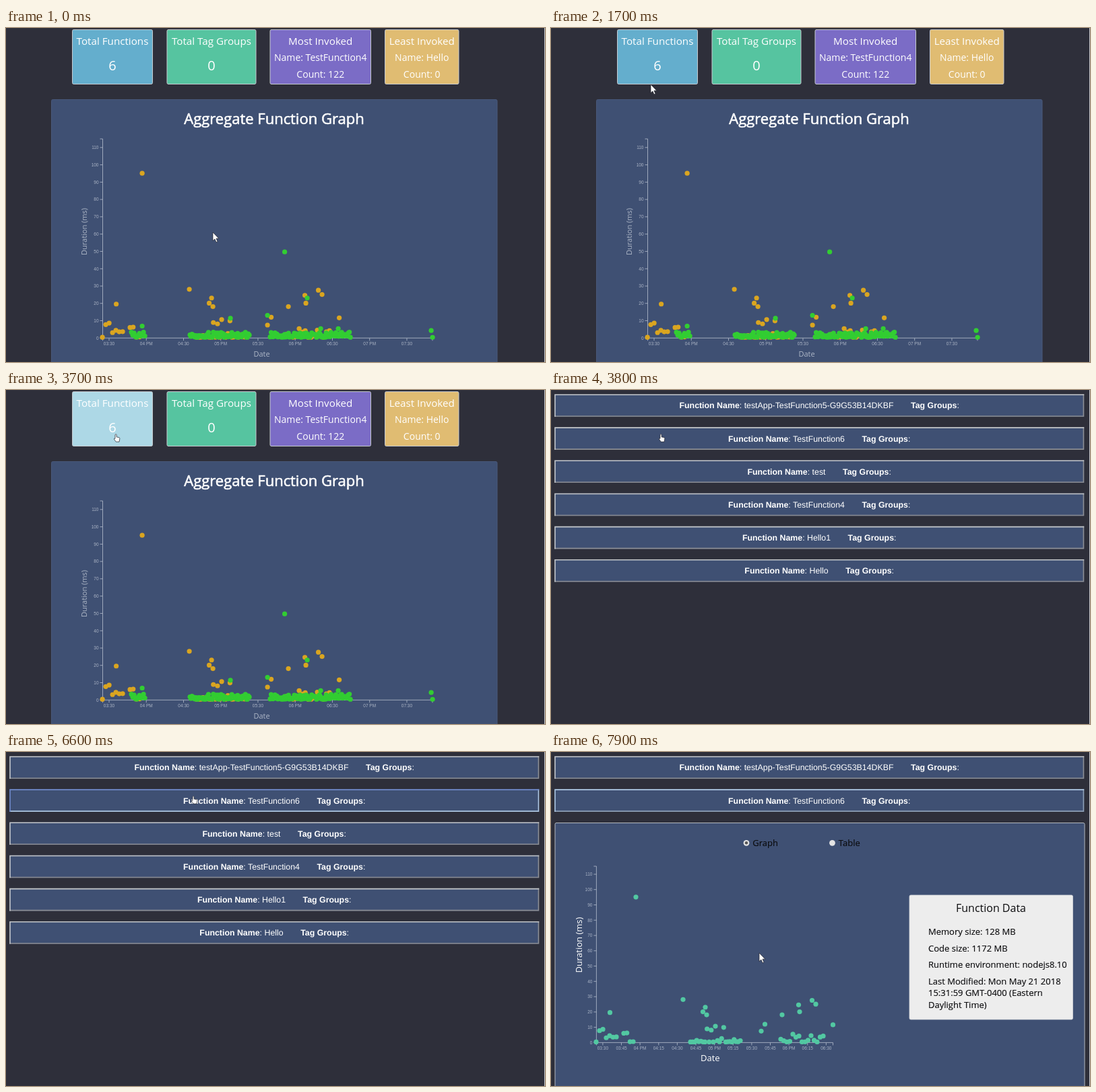
Write an HTML page that moves like this. It is 800x497 px and loops after 8 s.

```html
<!DOCTYPE html>
<html lang="en">
<head>
<meta charset="utf-8">
<title>Function dashboard</title>
<style>
  html, body { margin: 0; width: 100%; height: 100%; overflow: hidden; background: #2e2f3a; }
  svg { display: block; width: 100vw; height: 100vh; }
  text { font-family: "Open Sans", sans-serif; white-space: pre; }
  .small { font: 6.5px "Liberation Sans", Arial, sans-serif; }
  .row { font: 12.36px "Liberation Sans", Arial, sans-serif; text-rendering: geometricPrecision; }
</style>
</head>
<body>
<svg id="stage" viewBox="0 0 800 497" preserveAspectRatio="none"></svg>
<script>
const NS = "http://www.w3.org/2000/svg";
const stage = document.getElementById("stage");
const LOOP = 8000, OPEN_LIST = 3800, PRESS = 6600, OPEN_PANEL = 6700;
const BACK = "#2e2f3a", PANEL = "#3f5073", INK = "#0c0c0e";
const ROW_TOP = 6.2, ROW_STEP = 49.15, ROW_HEIGHT = 33.6, ROW_WIDTH = 786;

function add(parent, tag, attrs = {}, content = "") {
  const node = document.createElementNS(NS, tag);
  for (const key in attrs) node.setAttribute(key, attrs[key]);
  node.textContent = content;
  parent.appendChild(node);
  return node;
}

function label(parent, x, y, size, content, fill = "#fff", anchor = "middle", more = {}) {
  return add(parent, "text", { x, y, "font-size": size, fill, "text-anchor": anchor, ...more }, content);
}

function upright(parent, x, y, size, content, fill) {
  return label(parent, 0, 0, size, content, fill, "middle", { transform: `translate(${x} ${y}) rotate(-90)` });
}

function heavy(color, width) {
  return { stroke: color, "stroke-width": width };
}

function box(parent, x, y, width, height, fill, more = {}) {
  return add(parent, "rect", { x, y, width, height, fill, ...more });
}

function seeded(seed) {
  return () => (seed = (seed * 16807) % 2147483647) / 2147483647;
}

// Draws both axes and returns a function that plots [offset, ms] points.
function chart(parent, { x, zero, top, right, perMs, minutes, ink }) {
  const line = d => add(parent, "path", { d, fill: "none", stroke: ink, "stroke-width": 0.9 });
  const step = minutes * 1.8415;
  line(`M${x - 4} ${top}H${x}V${zero}H${x - 4}M${x} ${zero + 4}V${zero}H${right}V${zero + 4}`);
  for (let ms = 0; ms <= 110; ms += 10) {
    const y = zero - ms * perMs;
    line(`M${x - 4} ${y}h4`);
    label(parent, x - 6, y + 2.3, 6.5, ms, ink, "end", { class: "small" });
  }
  for (let i = 0, tx = x + 9.5; tx < right - 4; i++, tx += step) {
    const total = 210 + i * minutes;
    const hour = "0" + Math.floor(total / 60), rest = total % 60;
    line(`M${tx} ${zero}v4`);
    label(parent, tx, zero + 10.8, 6.5, rest ? `${hour}:${rest}` : `${hour} PM`, ink, "middle", { class: "small" });
  }
  return (points, fill) => points.forEach(([offset, ms]) =>
    add(parent, "circle", { cx: x - 0.4 + offset, cy: zero - 0.3 - ms * perMs, r: 3.6, fill }));
}

// Evenly spread calls from one offset to another, durations skewed towards zero.
function burst(random, from, to, count, longest, skew) {
  return Array.from({ length: count }, (_, i) =>
    [from + (to - from) * i / (count - 1), 0.3 + longest * random() ** skew]);
}

const random = seeded(29);
const slowCalls = [
  [59, 95], [129, 28], [162, 23], [158.5, 20], [164, 18], [20.5, 19.5],
  [276, 18], [300.5, 24.5], [302, 20], [320.5, 27.5], [326, 25], [351.5, 11.5],
  ...burst(random, 0, 30, 7, 9, 1),
  ...burst(random, 41, 55, 4, 12, 2),
  ...burst(random, 140, 214, 25, 11, 4),
  ...burst(random, 245, 250.5, 2, 12, 0.5),
  ...burst(random, 274, 337, 15, 6, 4)
];
const fastCalls = [
  ...burst(random, 43, 63, 11, 3, 1),
  ...burst(random, 130, 218, 62, 3, 1.6),
  ...burst(random, 249, 368, 84, 3, 1.6),
  [59, 6.8], [190, 11.3], [245, 13], [270.5, 49.6], [304, 23], [324, 5.3], [350, 5.3], [488, 4.2], [490, 0.3]
];

/* Dashboard */
const dashboard = add(stage, "g");
box(dashboard, 0, 0, 800, 497, BACK);
const cards = [
  [98.5, 119, "#64aecd", "Total Functions", "6"],
  [239, 132, "#56c4a0", "Total Tag Groups", "0"],
  [392, 149.5, "#7b6cc6", "Most Invoked", "Name: TestFunction4", "Count: 122"],
  [562.5, 109.5, "#e0bc72", "Least Invoked", "Name: Hello", "Count: 0"]
].map(([x, width, color, heading, ...lines]) => {
  const cx = x + width / 2;
  const rect = box(dashboard, x, 2.5, width, 81, color, { rx: 2, stroke: "#c6cacf" });
  label(dashboard, cx, 25, 15.2, heading);
  if (lines.length === 1) label(dashboard, cx, 63, 20, lines[0]);
  else lines.forEach((line, i) => label(dashboard, cx, 49.3 + i * 24.5, 14, line));
  return rect;
});
box(dashboard, 67.5, 106.5, 661.5, 400, PANEL, { rx: 2, stroke: "#48587a" });
label(dashboard, 398, 143, 22, "Aggregate Function Graph", "#fff", "middle", heavy("#fff", 0.6));
upright(dashboard, 120, 303, 11, "Duration (ms)", "#adb6c6");
label(dashboard, 379.5, 489, 11, "Date", "#adb6c6");
const plotAll = chart(dashboard, { x: 143.5, zero: 461.3, top: 165, right: 633, perMs: 2.577, minutes: 30, ink: "#aab3c4" });
plotAll(slowCalls, "#daa520");
plotAll(fastCalls, "#32cd32");

/* Function list */
const list = add(stage, "g");
box(list, 0, 0, 800, 497, BACK);
const names = ["testApp-TestFunction5-G9G53B14DKBF", "TestFunction6", "test", "TestFunction4", "Hello1", "Hello"];
const rows = names.map((name, i) => {
  const row = add(list, "g", { transform: `translate(5.2 ${ROW_TOP + i * ROW_STEP})` });
  const right = ROW_WIDTH - 0.8, bottom = ROW_HEIGHT - 0.8;
  const side = { fill: "none", "stroke-width": 1.6 };
  box(row, 0, 0, ROW_WIDTH, ROW_HEIGHT, PANEL);
  const lower = add(row, "path", { d: `M0 ${bottom}H${right}V0`, ...side });
  const upper = add(row, "path", { d: `M.8 ${ROW_HEIGHT}V.8H${ROW_WIDTH}`, ...side });
  const text = label(row, ROW_WIDTH / 2, 21.2, 12.36, "", "#fff", "middle", { class: "row" });
  add(text, "tspan", { "font-weight": 700 }, "Function Name");
  add(text, "tspan", {}, ": " + name);
  add(text, "tspan", { "font-weight": 700, dx: 25.5 }, "Tag Groups");
  add(text, "tspan", {}, ":");
  return { upper, lower };
});

function edge(row, upper, lower) {
  row.upper.setAttribute("stroke", upper);
  row.lower.setAttribute("stroke", lower);
}
rows.forEach(row => edge(row, "#c3c5c8", "#8b8d93"));

/* Opened function */
const detail = add(stage, "g");
box(detail, 0, 98, 800, 399, BACK);
box(detail, 6, 105.5, 786, 420, PANEL, { rx: 2, stroke: "#b4b9bf" });
["Graph", "Table"].forEach((name, i) => {
  const x = 290 + i * 127.5;
  add(detail, "circle", { cx: x, cy: 135.3, r: 4.4, fill: "#e4e4e4" });
  if (!i) add(detail, "circle", { cx: x, cy: 135.3, r: 2.2, fill: "#555" });
  label(detail, x + 9.3, 140, 13, name, INK, "start", heavy(INK, 0.15));
});
upright(detail, 45.5, 287, 13, "Duration (ms)", "#fff");
label(detail, 236.3, 460, 13, "Date");
const plotOne = chart(detail, { x: 67.4, zero: 432.4, top: 170, right: 418.5, perMs: 2.277, minutes: 15, ink: "#a9b3c5" });
plotOne(slowCalls, "#52c8a2");

box(detail, 532, 213, 242.5, 185, "#ededed", { rx: 2, stroke: "#d4d6da", "stroke-width": 0.8 });
label(detail, 653, 237.5, 16, "Function Data", INK);
[
  "Memory size: 128 MB",
  "Code size: 1172 MB",
  "Runtime environment: nodejs8.10",
  "Last Modified: Mon May 21 2018\n15:31:59 GMT-0400 (Eastern\nDaylight Time)"
].forEach((entry, i) => entry.split("\n").forEach((line, j) =>
  label(detail, 560, 272 + i * 24.5 + j * 17.7, 13, line, INK, "start", heavy(INK, 0.15))));

box(stage, 799, 0, 1, 497, "#c9cacd");

/* Pointer */
const pointer = add(stage, "path", { fill: "#fff", stroke: "#20222a", "stroke-width": 0.7, "stroke-linejoin": "round" });
const ARROW = "M0 0V12.6L2.9 10L5 14.8L7 13.9L5 9.2H8.8Z";
const HAND = "M-1 1Q0 -.8 1.1 1V4.4L5 5.2Q6 5.6 5.8 7L5 11.6H.2L-2.6 7.6Q-2.8 6 -1 6.8Z";
const home = { x: 307, y: 304 };
const moves = [
  { from: 200, to: 1700, x: 148, y: 84 },
  { from: 1700, to: 2200, x: 163, y: 65.5 },
  { from: 3900, to: 4900, x: 284, y: 14.5 },
  { from: 5700, to: 6300, x: 278, y: 65.5 },
  { from: 7150, to: 7850, x: 309, y: 299 }
];

function pointerAt(time) {
  let { x, y } = home;
  for (const move of moves) {
    const p = Math.min(1, Math.max(0, (time - move.from) / (move.to - move.from)));
    const eased = p * p * (3 - 2 * p);
    x += (move.x - x) * eased;
    y += (move.y - y) * eased;
  }
  return { x, y };
}

function show(node, visible) {
  node.setAttribute("display", visible ? "inline" : "none");
}

function render(time) {
  const { x, y } = pointerAt(time);
  const inList = time >= OPEN_LIST, opened = time >= OPEN_PANEL;
  const overCard = !inList && y < 83.5 && x > 98 && x < 218;
  const overRow = inList && y > ROW_TOP && (y - ROW_TOP) % ROW_STEP < ROW_HEIGHT && (!opened || y < 90);

  show(dashboard, !inList);
  show(list, inList);
  show(detail, opened);
  cards[0].setAttribute("fill", overCard ? "#add8e6" : "#64aecd");

  if (opened) edge(rows[1], "#adc6e2", "#8d9fb6");
  else if (time >= PRESS) edge(rows[1], "#6f88c8", "#adc6e2");
  else edge(rows[1], "#c3c5c8", "#8b8d93");

  pointer.setAttribute("d", overCard || overRow ? HAND : ARROW);
  pointer.setAttribute("transform", `translate(${x} ${y})`);
}

const start = performance.now();
function tick() {
  const time = (performance.now() - start) % LOOP;
  render(Math.floor(time / 100) * 100);
  requestAnimationFrame(tick);
}
tick();
</script>
</body>
</html>
```
